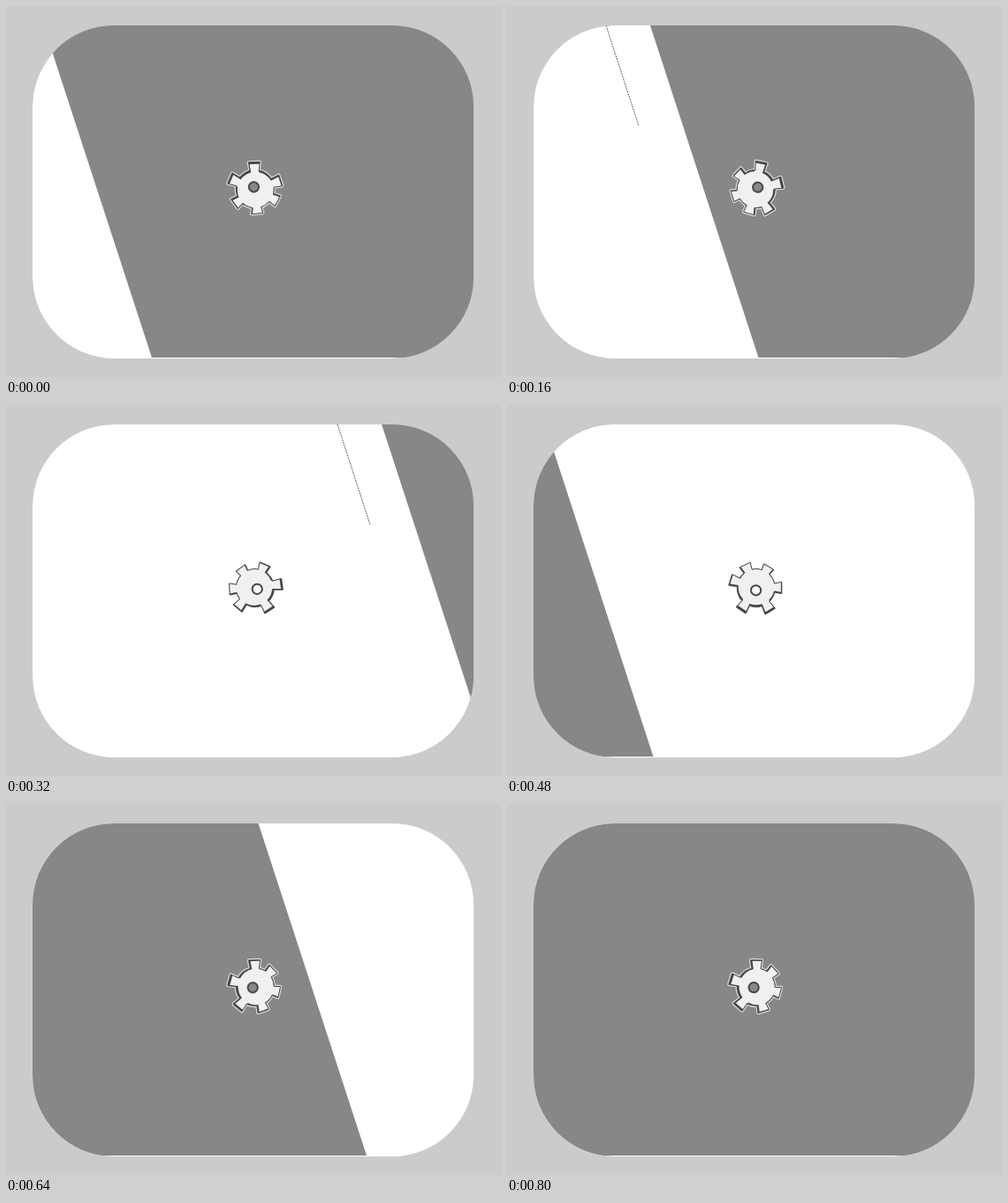
An HTML page with a canvas that plays this animation: 560x420 px, repeating every 0.88 s.

```html
<!DOCTYPE html>
<html lang="en">
<head>
<meta charset="utf-8">
<title>Gear wipe</title>
<style>
  html, body { margin: 0; width: 100%; height: 100%; overflow: hidden; background: #cbcbcb; }
  canvas { display: block; }
</style>
</head>
<body>
<canvas id="stage" width="560" height="420"></canvas>
<script>
const ctx = document.getElementById('stage').getContext('2d');
const STEP = 80;
const GRAY = '#878787', WHITE = '#fff', DARK = '#484848';
const PANEL = { x: 30, y: 22, w: 499, h: 377, r: 92 };
const SLOPE = 0.3258;
const SECOND_SWEEP = 6;
const PIVOT = { x: 281.8, y: 207.1 };

// Per step: wipe edge at the panel top, and gear heading in degrees.
const EDGES = [42.5, 102, 162, 249, 425, 520, 43, 128, 285.5, 400, 520];
const HEADINGS = [-92, -54, -14, 14, 57, 90, 124, 160, 195, 196, 197];

// Hand-drawn teeth: [angle, length]
const TEETH = [[0, 30], [73.5, 30], [120, 28.5], [177, 27.5], [236, 28.5], [295, 30.5]];

const rad = deg => deg * Math.PI / 180;

function makeGear() {
  const path = new Path2D();
  const body = 21, half = 12.4;
  TEETH.forEach(([angle, length], i) => {
    const a = rad(angle), cos = Math.cos(a), sin = Math.sin(a);
    const point = (u, v) => path.lineTo(u * cos - v * sin, u * sin + v * cos);
    point(20.5, -4.5);
    point(length, -6);
    point(length, 6);
    point(20.5, 4.5);
    const next = i < TEETH.length - 1 ? TEETH[i + 1][0] : 360;
    path.arc(0, 0, body, rad(angle + half), rad(next - half));
  });
  path.closePath();
  return path;
}
const gear = makeGear();

function strokeGear(color, width) {
  ctx.strokeStyle = color;
  ctx.lineWidth = width;
  ctx.stroke(gear);
}

function drawGear(heading, behind) {
  ctx.save();
  ctx.translate(PIVOT.x, PIVOT.y);
  ctx.rotate(rad(heading));
  ctx.lineJoin = 'round';
  strokeGear('rgba(255,255,255,0.7)', 4.4);
  strokeGear(DARK, 2);
  ctx.fillStyle = DARK;
  ctx.fill(gear);

  // The offset face leaves a thick shade on the leading side.
  ctx.save();
  ctx.clip(gear);
  ctx.rotate(rad(-20));
  ctx.translate(-1.3, 0);
  ctx.rotate(rad(20));
  ctx.scale(0.975, 0.975);
  ctx.fillStyle = '#f0f0f0';
  ctx.fill(gear);
  ctx.restore();

  ctx.rotate(rad(-30));
  ctx.beginPath();
  ctx.arc(2.7, 0, 5.6, 0, 2 * Math.PI);
  ctx.fillStyle = behind;
  ctx.fill();
  ctx.strokeStyle = DARK;
  ctx.lineWidth = 2;
  ctx.stroke();
  ctx.restore();
}

function drawPanel(edge, left, right, withTrail) {
  const { x, y, w, h, r } = PANEL;
  const bottom = y + h;
  ctx.save();
  ctx.beginPath();
  ctx.roundRect(x, y, w, h, r);
  ctx.clip();
  ctx.fillStyle = right;
  ctx.fillRect(x, y, w, h);

  ctx.beginPath();
  ctx.moveTo(0, y);
  ctx.lineTo(edge, y);
  ctx.lineTo(edge + SLOPE * h, bottom);
  ctx.lineTo(0, bottom);
  ctx.fillStyle = left;
  ctx.fill();

  if (withTrail) {
    ctx.beginPath();
    ctx.moveTo(edge - 50, y);
    ctx.lineTo(edge - 50 + SLOPE * 114, y + 114);
    ctx.setLineDash([2, 1]);
    ctx.strokeStyle = '#333';
    ctx.lineWidth = 0.8;
    ctx.stroke();
  }

  ctx.fillStyle = WHITE;
  ctx.fillRect(x, bottom - 1, w, 1);
  ctx.restore();
}

function draw(step) {
  ctx.fillStyle = '#cbcbcb';
  ctx.fillRect(0, 0, 560, 420);
  const first = step < SECOND_SWEEP;
  const [left, right] = first ? [WHITE, GRAY] : [GRAY, WHITE];
  const edge = EDGES[step];
  drawPanel(edge, left, right, first);
  const edgeAtGear = edge + SLOPE * (PIVOT.y - PANEL.y);
  drawGear(HEADINGS[step], PIVOT.x < edgeAtGear ? left : right);
}

const start = performance.now();
function tick() {
  const elapsed = Math.max(0, performance.now() - start);
  draw(Math.floor(elapsed / STEP) % EDGES.length);
  requestAnimationFrame(tick);
}
tick();
</script>
</body>
</html>
```
